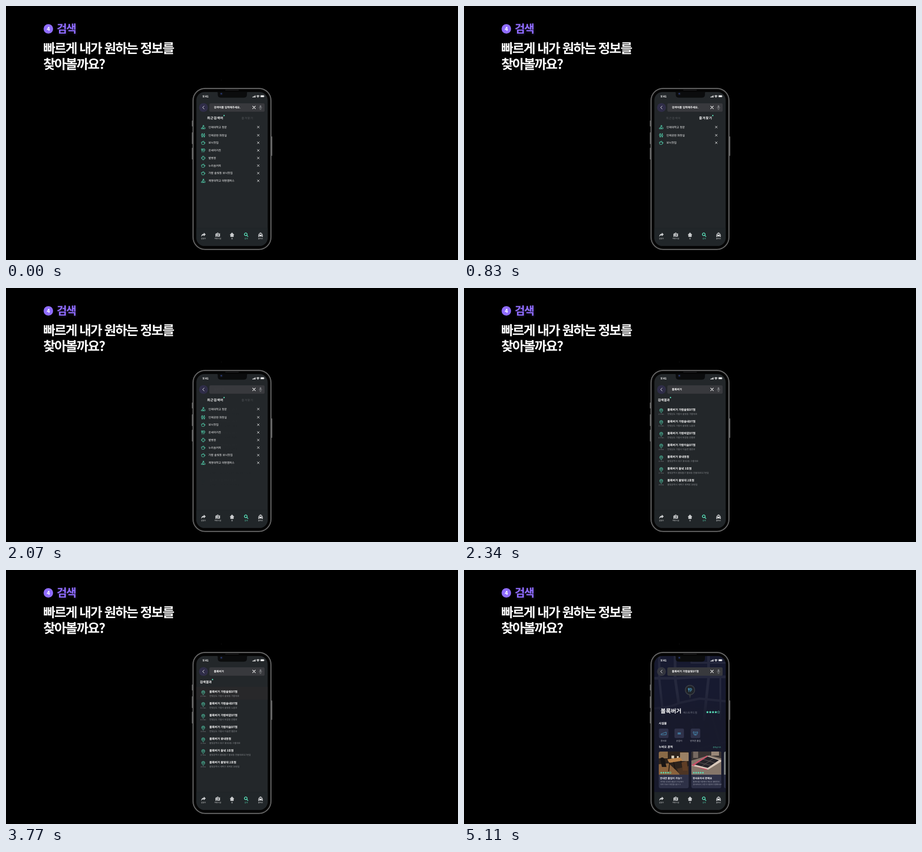
An HTML page for the animation above (5.34 s loop, 998x561 px).

```html
<!DOCTYPE html>
<html lang="ko">
<head>
<meta charset="utf-8">
<style>
  html, body { margin: 0; width: 100%; height: 100%; overflow: hidden; background: #000; }
  svg { display: block; width: 100vw; height: 100vh; }
  text { font-family: 'Noto Sans CJK KR', 'Noto Sans KR', 'Noto Sans', sans-serif; text-rendering: geometricPrecision; white-space: pre; }
</style>
</head>
<body>
<svg id="stage" viewBox="0 0 998 561"></svg>
<script>
const LOOP = 5340;
const TEAL = '#5ae6be', GREY = '#8b8e92', BLUE = '#4ba3cf', PURPLE = '#8f6cff';

// Text is placed by its left edge (or anchor) and vertical centre.
const text = (x, cy, size, str, { fill = '#fff', weight = 500, anchor = 'start', gap = 0 } = {}) =>
  `<text x="${x}" y="${cy + size * 0.38}" font-size="${size}" font-weight="${weight}" fill="${fill}" text-anchor="${anchor}" letter-spacing="${gap}">${str}</text>`;
const rect = (x, y, w, h, fill, r = 0) =>
  `<rect x="${x}" y="${y}" width="${w}" height="${h}" rx="${r}" fill="${fill}"/>`;
const dot = (x, y, r, fill) => `<circle cx="${x}" cy="${y}" r="${r}" fill="${fill}"/>`;
const line = (d, color, width = 0.9, x = 0, y = 0) =>
  `<path d="${d}" transform="translate(${x} ${y})" fill="none" stroke="${color}" stroke-width="${width}" stroke-linecap="round" stroke-linejoin="round"/>`;
const solid = (d, fill, x = 0, y = 0) =>
  `<path d="${d}" transform="translate(${x} ${y})" fill="${fill}" fill-rule="evenodd"/>`;
const group = (id, body) => `<g id="${id}">${body}</g>`;
const cross = (x, y, r, w) => line(`M${-r} ${-r}L${r} ${r}M${r} ${-r}L${-r} ${r}`, '#fff', w, x, y);

function star(x, y, r, filled = true) {
  const points = Array.from({ length: 10 }, (_, i) => {
    const a = i * Math.PI / 5, q = i % 2 ? r * 0.48 : r;
    return `${(x + q * Math.sin(a)).toFixed(2)},${(y - q * Math.cos(a)).toFixed(2)}`;
  });
  return `<polygon points="${points.join(' ')}" fill="${filled ? TEAL : 'none'}" stroke="${TEAL}" stroke-width="${filled ? 0 : 0.6}"/>`;
}
const stars = (x, y, pitch, r, count) =>
  [0, 1, 2, 3, 4].map(i => star(x + i * pitch, y, r, i < count)).join('');

const icons = {
  campus: 'M-4 3.8H4V1.2L1 -.8L-4 2.2ZM-2.6 1.3L-.4 -1V-4L2 -3L-.4 -2M-1 3.8V2.2H1V3.8',
  restroom: 'M-2.2 -4a.7 .7 0 1 0 .01 0M-3.6 -1.8H-.9V1H-1.4V4H-3V1H-3.6ZM2.2 -4a.7 .7 0 1 0 .01 0M1.5 -1.8H2.9L3.7 1.4H2.9V4H1.5V1.4H.7Z',
  cup: 'M-3.8 -1.3H2.8V1.6Q2.8 3.8 .6 3.8H-1.6Q-3.8 3.8 -3.8 1.6ZM2.8 -.8Q4.8 -.8 4 1Q3.6 1.7 2.8 1.7M-2.2 -2.2Q-1 -4.2 1.6 -3.3',
  dining: 'M-3.8 -3.8V-1.2Q-3.8 .3 -2.4 .3Q-1 .3 -1 -1.2V-3.8M-2.4 -3.8V3.9M1.2 -3.8V3.9M1.2 -3.8Q4 -3.6 4 -.9Q4 1.3 1.2 1.3',
  hospital: 'M-1.4 -4H1.4V-1.4H4V1.4H1.4V4H-1.4V1.4H-4V-1.4H-1.4Z',
  pin: 'M0 4.4C-1.2 2.8 -3.5 1 -3.5 -1A3.5 3.5 0 0 1 3.5 -1C3.5 1 1.2 2.8 0 4.4ZM0 -2.7a1.7 1.7 0 1 0 .01 0',
};

const places = [
  ['campus', 267.4, '인제대학교 정문'], ['restroom', 285.5, '인제공원 화장실'],
  ['cup', 302, '보늬찻집'], ['dining', 319, '온새미키친'], ['hospital', 335.8, '볕병원'],
  ['cup', 352.5, '누리솜커피'], ['cup', 369.2, '가람 솔빛동 보늬찻집'], ['campus', 386, '계명대학교 대명캠퍼스'],
];
const placeRow = ([icon, y, name]) =>
  line(icons[icon], TEAL, 0.9, 435.5, y) + text(447, y, 6.05, name) + cross(557, y, 2.2, 0.9);

const BRAND = '볼록버거', BRANCH = BRAND + ' 가람솔빛DT점';
const results = [
  ['2.5', BRANCH, '한빛남도 가람시 솔빛동 가람대로'],
  ['3.2', BRAND + ' 가람솔내DT점', '한빛남도 가람시 솔빛동 노을로'],
  ['4.3', BRAND + ' 가람바깥DT점', '한빛남도 가람시 바깥동 은별로'],
  ['10', BRAND + ' 가람이슬DT점', '한빛남도 가람시 이슬면 별문로'],
  ['11', BRAND + ' 꽃내동점', '물빛광역시 윗구 꽃내2동 구름대로'],
  ['17', BRAND + ' 들녘 3호점', '물빛광역시 물빛들구 들녘동 한들대로517번길'],
  ['18', BRAND + ' 물빛대 2호점', '물빛광역시 새벽구 새벽로 38번길'],
];
const resultRow = ([km, name, address], i) => {
  const y = 269 + 26 * i;
  return line(icons.pin, TEAL, 0.9, 435.5, y + 2) +
    text(435.3, y + 9.8, 3.9, km + ' Km', { fill: GREY, weight: 400, anchor: 'middle' }) +
    text(449, y, 6.3, name, { weight: 700 }) + text(449, y + 9.6, 4.8, address, { fill: GREY, weight: 400 });
};

function tabs(active) {
  const labels = [['최근검색어', 444, 446, 481.5], ['즐겨찾기', 519, 520, 549.3]];
  return labels.map(([name, on, off, mark], i) => i === active
    ? text(on, 247, 7.2, name, { weight: 700, gap: 0.6 }) + dot(mark, 242, 1.4, TEAL)
    : text(off, 247.5, 6.3, name, { weight: 400, gap: 0.7, fill: '#56595d' })).join('');
}

const headline = (cy, str) => text(82.2, cy, 29, str, { weight: 700, gap: -2.15 });
const heading = dot(93.5, 50.5, 10.5, PURPLE) +
  text(93.5, 50.4, 12, '4', { weight: 700, anchor: 'middle' }) +
  `<g style="filter:drop-shadow(1px 2px 2px #8f6cff44)">${text(112, 49.8, 24.6, '검색', { fill: PURPLE, weight: 700, gap: -1.7 })}</g>` +
  headline(93, '빠르게 내가 원하는 정보를') + headline(128, '찾아볼까요?');

const sideButton = (x, y, h) => rect(x, y, 2.4, h, '#5d5d5d', 1);
const body = dot(475.5, 163.5, 1.2, '#0c0c0c') +
  sideButton(410.2, 253, 13) + sideButton(410.2, 279, 26) + sideButton(410.2, 313, 26) + sideButton(585.6, 288, 43) +
  '<rect x="412.8" y="181.8" width="172.4" height="356" rx="27" fill="#050505" stroke="#777" stroke-width="1.8"/>' +
  '<rect x="414.6" y="183.6" width="168.8" height="352.4" rx="25.4" fill="none" stroke="#2c2c2c" stroke-width=".9"/>';

const notch = solid('M465.5 189.5Q467.5 190 467.5 192V195.5Q467.5 202.5 474.5 202.5H525Q532 202.5 532 195.5V192Q532 190 534 189.5Z', '#0b0c0d') +
  rect(484, 184.8, 30, 2, '#1b1b1c', 1) + dot(475.5, 193.8, 3.3, '#15171d') + dot(475.5, 193.8, 1.6, '#1d2c66') + dot(475, 193.4, 0.6, '#5974c8');

const status = text(434, 199.7, 6.3, '9:41', { weight: 700 }) +
  [0, 1, 2, 3].map(i => rect(544 + i * 1.9, 200.4 - i, 1.3, 1.6 + i, '#fff', 0.3)).join('') +
  line('M-2.8 -.9Q0 -3.2 2.8 -.9M-1.6 .6Q0 -.8 1.6 .6', '#fff', 1.1, 556.3, 199.7) + dot(556.3, 201.6, 0.8, '#fff') +
  '<rect x="561.7" y="197" width="8.4" height="4.6" rx="1.3" fill="none" stroke="#fff" stroke-opacity=".5" stroke-width=".5"/>' +
  rect(562.3, 197.6, 7.2, 3.4, '#fff', 0.8) + rect(570.7, 198.5, 0.7, 1.6, '#aaa', 0.3);

const searchBar = rect(449, 215, 122, 18.5, '#38393d', 3) +
  line('M1.5 -3.3L-1.8 0L1.5 3.3', '#fff', 1, 436, 224.2) + cross(547.6, 224, 3, 1.1) +
  rect(560.1, 219.2, 3.6, 6.4, '#77797d', 1.8) + line('M-3.2 0Q-3.2 3.4 0 3.4Q3.2 3.4 3.2 0M0 3.4V5M-1.6 5H1.6', '#77797d', 0.8, 561.9, 223.7);
const query = (id, str) => group(id, text(459, 223.8, 6, str, { weight: 700 }));

const navItems = [
  [436, '길찾기', solid('M5 -1L.8 -5V-2.6C-3 -2.4 -5 0 -4.8 4.4C-3.6 1.8 -2 .9 .8 .9V3.2Z', '#c9cbcd', 436, 505.5)],
  [467.5, '주변시설', solid('M-5 -2.5L-2 -3.5V3.5L-5 4.5ZM-1.4 -.5L1.4 2V4.5L-1.4 3.4ZM2 1.5L2.6 -2.8L5 -3.6V3.5L2 4.5ZM0 1.2C-1 -.2 -2.2 -1.4 -2.2 -2.8A2.2 2.2 0 0 1 2.2 -2.8C2.2 -1.4 1 -.2 0 1.2ZM0 -3.6a.8 .8 0 1 0 .01 0', '#c9cbcd', 467.5, 505.5)],
  [499, '홈', solid('M0 -5L5.2 .3H3.6V4.6H-3.6V.3H-5.2Z', '#c9cbcd', 499, 505.3)],
  [530.2, '검색', line('M-.8 -4a3 3 0 1 0 .01 0M1.4 1.2L4 3.9', TEAL, 1.6, 530.2, 505.3)],
  [562, '콜택시', solid('M-1.3 -5H1.3V-3.7H3L4.2 -.8L5 0V4.6H3.4V3.4H-3.4V4.6H-5V0L-4.2 -.8L-3 -3.7H-1.3ZM-2.3 -2.5L-3 -.7H3L2.3 -2.5ZM-3.2 .7a.8 .8 0 1 0 .01 0M3.2 .7a.8 .8 0 1 0 .01 0', '#d6d8da', 562, 505.5)],
];
const nav = rect(420, 490.5, 158, 40, '#212629') + rect(420, 490.3, 158, 0.5, '#1b1f22') +
  navItems.map(([x, label, icon]) => icon + text(x, 513.4, 4, label, { anchor: 'middle', fill: label === '검색' ? TEAL : '#e4e5e6' })).join('');

const facility = (x, labelX, label, icon) => rect(x, 350.3, 21, 21, '#2f324a', 3) + icon +
  text(labelX, 377.5, 4.8, label, { fill: '#c5c7cf', weight: 400, anchor: 'middle' });

function card(x, count, title, lines, photo) {
  const id = 'photo' + x;
  return rect(x, 401, 66, 81, '#2e3147', 4) +
    `<clipPath id="${id}"><path d="M${x} 452V405Q${x} 401 ${x + 4} 401H${x + 62}Q${x + 66} 401 ${x + 66} 405V452Z"/></clipPath>` +
    `<g clip-path="url(#${id})"><g transform="translate(${x} 401)">${photo}</g></g>` +
    stars(x + 5.5, 447.7, 5, 2.5, count) + text(x + 2.8, 459.6, 5.6, title, { weight: 700 }) +
    lines.map((s, i) => text(x + 3.6, 467 + i * 6.5, 4, s, { fill: '#a4a7b4', weight: 400 })).join('');
}

const cafe = rect(0, 0, 66, 51, '#2c221c') + rect(0, 0, 20, 15, '#8a6a47') + rect(47, 2, 19, 19, '#9a8064') +
  solid('M0 28L22 26L48 51H0Z', '#8a623c') + solid('M40 38L66 32V51H46Z', '#4d3524') +
  solid('M19 17L47 13L53 20L23 25Z', '#b98148') +
  line('M24 25L22 43M49 21L54 39M33 24L36 38', '#1c1411', 1.8) +
  solid('M3 15Q9 10 13 17L17 34H7Z', '#191514') + solid('M50 24L62 21L64 42H53Z', '#5f3d25') +
  solid('M28 9H34V15H28ZM40 10H44V14H40Z', '#d5c9b5');
const ramp = rect(0, 0, 66, 51, '#85766a') + solid('M0 0H66V15L40 8L0 20Z', '#3a3433') + rect(4, 0, 11, 14, '#766961') + rect(44, 0, 17, 9, '#998778') +
  solid('M0 31L34 9L66 19V22L37 40Z', '#d8c8ba') + solid('M0 30L34 9L37 10L5 32L35 39L33 41Z', '#c9526a') +
  solid('M8 29L36 11L61 19L36 36Z', '#252329') +
  line('M17 24L44 31M26 17L52 25M22 33L49 15', '#85766f', 0.7);

const roads = [
  ['M420 239H470L520 236H578', 6], ['M466 188V238L474 294', 6], ['M420 306Q462 302 474 294', 5],
  ['M431 188V238L440 325', 5], ['M502 188V205H578', 4], ['M540 188V238L530 330', 6],
  ['M474 294L520 284L578 290', 5], ['M566 238V330', 4],
];
const detail = rect(420, 190, 158, 301, '#171a30') +
  roads.map(([d, w]) => line(d, '#25283d', w)).join('') +
  line('M500 325L520 400L510 491M420 420L578 380M548 325L570 400', '#1d2034', 5) +
  '<rect x="420" y="270" width="158" height="221" fill="url(#shade)"/>' +
  dot(436, 224.2, 9.8, '#34363f') +
  solid('M496 273H502L499 284Z', '#34373d') + dot(499, 265, 11.2, '#3b3e44') + dot(499, 265, 9.5, '#20242a') + line(icons.dining, BLUE, 1, 499, 265) +
  text(434, 311.5, 12.5, BRAND, { weight: 700 }) + text(484, 314.5, 5.6, '패스트푸드점', { fill: '#777b88', weight: 400 }) +
  stars(537.5, 314, 6.15, 3.1, 4) +
  text(430, 339, 6.4, '시설물', { weight: 700 }) +
  facility(430.4, 440.6, '경사로', line('M-5.5 3H5.5V-3L-5.5 1Z', BLUE, 0.9, 441, 361)) +
  facility(464.7, 475.2, '손잡이', line('M-3 -1.2H3M-3 1.2H3', BLUE, 1.3, 475.2, 361)) +
  facility(500.6, 511, '반려견 출입', line('M-2.5 -2.8H2.5L4.5 -3.6L5 -.8L3.4 0V2Q3 3.8 0 3.8Q-3 3.8 -3.4 2V0L-5 -.8L-4.5 -3.6ZM-1.6 -.6V-.3M1.6 -.6V-.3M-1 1.4H1L0 2.3Z', BLUE, 0.9, 511, 361)) +
  text(430, 391, 6.4, '누비오 흔적', { weight: 700 }) + text(567.3, 392, 3.9, '흔적남기기', { fill: TEAL, anchor: 'end' }) +
  card(430, 4, '안내견 출입이 가능!!', ['귀여운 안내견 출입이 가능해서', '자주 가요!! 추천합니당ㅎㅎ'], cafe) +
  card(502, 5, '경사로라서 편해요', ['휠체어를 이용해서 계단은 불편한데', '경사로라서 그런가 이용하기 편했어요!'], ramp) +
  rect(574, 401, 66, 81, '#2e3147', 4) + solid('M574 405Q574 401 578 401V452H574Z', '#7c8180');

const stage = document.getElementById('stage');
stage.innerHTML = `<defs>
  <clipPath id="screen"><rect x="420.3" y="190" width="157.4" height="340" rx="18"/></clipPath>
  <linearGradient id="shade" x1="0" y1="0" x2="0" y2="1"><stop stop-color="#181a2c" stop-opacity="0"/><stop offset=".26" stop-color="#181a2b" stop-opacity=".85"/></linearGradient>
  </defs>` + heading + body + '<g clip-path="url(#screen)">' +
  rect(420, 190, 158, 340, '#23272a') + dot(436, 224.2, 9.8, '#2f2d48') +
  group('highlight', rect(420, 258, 158, 28.5, '#28282a')) +
  group('shared', places.slice(0, 3).map(placeRow).join('')) +
  group('recent', tabs(0) + places.slice(3).map(placeRow).join('')) +
  group('favourites', tabs(1)) +
  group('results', text(428, 247, 7.1, '검색결과', { weight: 700 }) + dot(456, 242, 1.4, TEAL) + results.map(resultRow).join('')) +
  group('detail', detail) + searchBar +
  query('hint', '검색어를 입력해주세요.') + query('typed', BRAND) + query('chosen', BRANCH) +
  status + nav + '</g>' + notch;

const show = (id, opacity) => document.getElementById(id).setAttribute('opacity', opacity);
const fade = (t, from, to) => {
  const p = Math.min(1, Math.max(0, (t - from) / (to - from)));
  return p * (2 - p);
};

function draw() {
  const t = performance.now() % LOOP;
  const favourites = fade(t, 600, 830) - fade(t, 1670, 1900);
  const found = fade(t, 2070, 2260);
  const opened = t >= 3940 ? 1 : 0;
  show('shared', 1 - found);
  show('recent', (1 - favourites) * (1 - found));
  show('favourites', favourites);
  show('hint', 1 - fade(t, 1880, 2060));
  show('results', found);
  show('typed', found * (1 - opened));
  show('highlight', (fade(t, 3240, 3400) + fade(t, 3640, 3770)) / 2);
  show('detail', opened);
  show('chosen', opened);
  requestAnimationFrame(draw);
}
draw();
</script>
</body>
</html>
```
